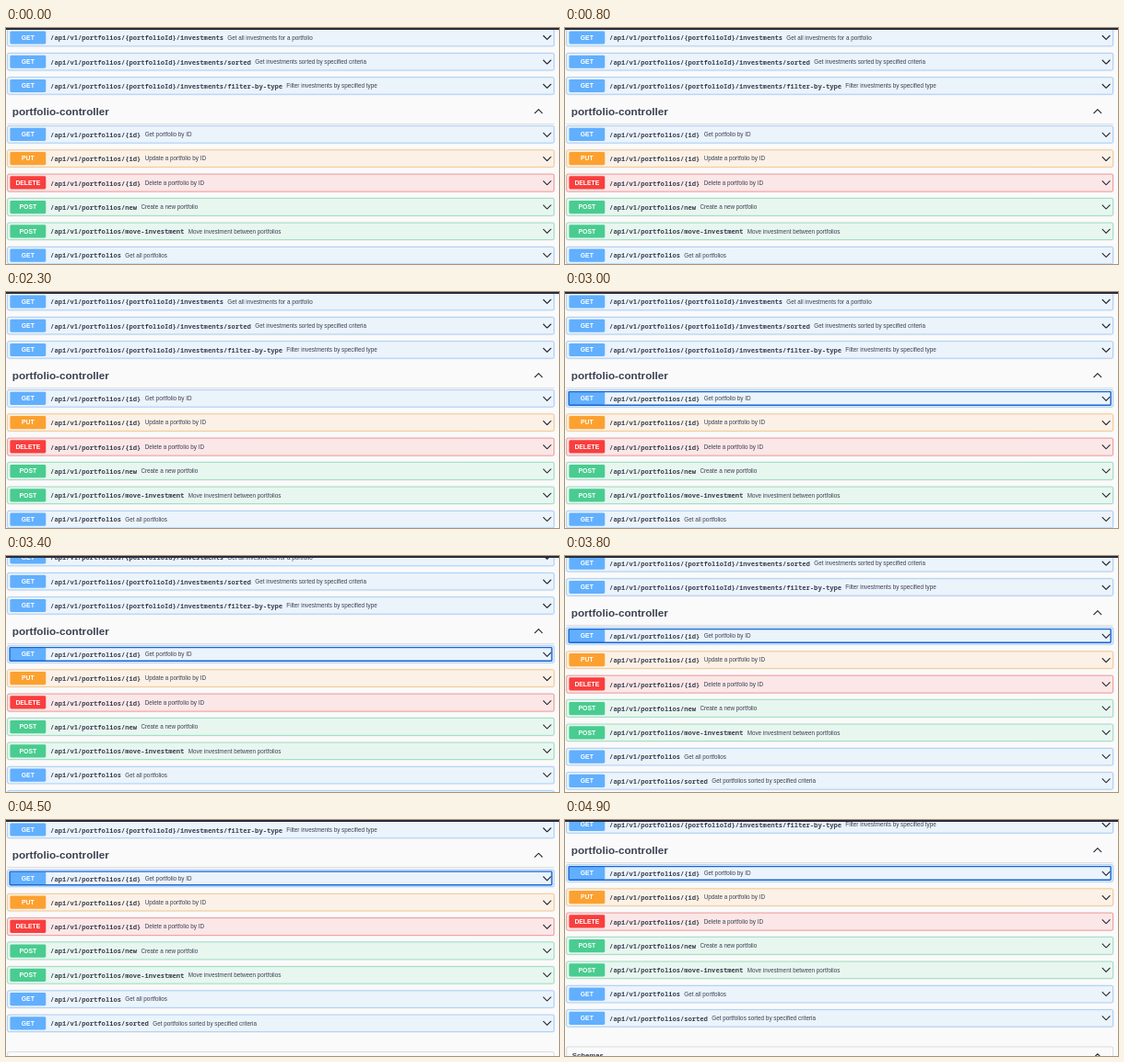
Recreate the animation shown at these times as an HTML page. Size 600 px wide and 257 px high, loop 5 s.

```html
<!DOCTYPE html>
<html lang="en">
<head>
<meta charset="utf-8">
<title>API list</title>
<style>
  html, body { margin: 0; width: 100%; height: 100%; overflow: hidden; background: #fafafa; }
  body { position: relative; font-family: "Liberation Sans", Arial, sans-serif; color: #3b4151; }
  #bar { position: absolute; top: 0; left: 0; width: 100%; height: 1.7px; background: #292a3b; }
  /* The page is laid out at full size and scaled down to the stage. */
  #page { position: absolute; top: 0; left: 0; width: 1235px; height: 700px; transform-origin: 0 0; }
  .row, .head, .box { position: absolute; left: 3px; width: 1221px; box-sizing: border-box;
    display: flex; align-items: center; white-space: pre; }
  .row { height: 39.2px; padding: 0 5px; border: 1px solid var(--c); border-radius: 4px;
    background: color-mix(in srgb, var(--c) 10%, transparent); box-shadow: 0 0 3px rgba(0,0,0,.19); }
  .row b { width: 80px; height: 29px; line-height: 29px; border-radius: 3px; text-align: center;
    background: var(--c); color: #fff; font-size: 14px; }
  code { margin: 0 9px 0 10px; font: 600 14.65px "Noto Sans Mono", monospace; }
  .row span { flex: 1; font-size: 13px; }
  .row.focus::after { content: ""; position: absolute; inset: 2px 3px; border: 3px solid #1b66d2; border-radius: 3px; }
  .head { height: 54px; padding: 0 25px 0 11px; border-bottom: 1px solid rgba(59,65,81,.3); font: bold 24px "Liberation Sans", Arial, sans-serif; }
  .box { height: 42px; padding: 0 24px 0 12px; border: 1px solid rgba(59,65,81,.35); border-radius: 4px; font: bold 16px "Liberation Sans", Arial, sans-serif; }
  .head span, .box span { flex: 1; }
  svg { width: 20px; height: 12px; fill: none; stroke: #20242e; stroke-width: 2.3; }
  .up { transform: scaleY(-1); }
  .copy { position: relative; height: 24px; border-radius: 4px; background: #7d8293; overflow: hidden; }
  .copy::after { content: ""; position: absolute; left: 4px; top: 6px; width: 11px; height: 10px; border: 1.5px solid #fff; }
</style>
</head>
<body>
<div id="page"></div>
<div id="bar"></div>
<script>
const SCALE = 0.486, PITCH = 26.3, LOOP = 5000;
const colors = { GET: "#61affe", PUT: "#fca130", DELETE: "#f93e3e", POST: "#49cc90" };
const base = "/api/v1/portfolios", inv = base + "/{portfolioId}/investments";
const lists = [
  [10.4, [
    ["GET", inv, "Get all investments for a portfolio"],
    ["GET", inv + "/sorted", "Get investments sorted by specified criteria"],
    ["GET", inv + "/filter-by-type", "Filter investments by specified type"]]],
  [116, [
    ["GET", base + "/{id}", "Get portfolio by ID"],
    ["PUT", base + "/{id}", "Update a portfolio by ID"],
    ["DELETE", base + "/{id}", "Delete a portfolio by ID"],
    ["POST", base + "/new", "Create a new portfolio"],
    ["POST", base + "/move-investment", "Move investment between portfolios"],
    ["GET", base, "Get all portfolios"],
    ["GET", base + "/sorted", "Get portfolios sorted by specified criteria"]]]
];
const page = document.getElementById("page");
const arrow = cls => `<svg class="${cls}" viewBox="0 0 20 12"><path d="M1 1.5L10 10.5L19 1.5"/></svg>`;

function add(cls, mid, height, html) {
  const el = document.createElement("div");
  el.className = cls;
  el.style.top = mid / SCALE - height / 2 + "px";
  el.innerHTML = html;
  page.append(el);
  return el;
}

const rows = lists.flatMap(([y, list]) => list.map(([method, path, text], i) => {
  const el = add("row", y + i * PITCH, 39.2,
    `<b>${method}</b><code>${path}</code><span>${text}</span>${arrow("")}<div class="copy"></div>`);
  el.style.setProperty("--c", colors[method]);
  return el;
}));
add("head", 91.2, 54, `<span>portfolio-controller</span>${arrow("up")}`);
add("box", 315, 42, `<span>Schemas</span>${arrow("up")}`);

// Piecewise linear value through [time, value] points
function along(points, t) {
  let [t0, v0] = points[0];
  for (const [t1, v1] of points) {
    if (t < t1) return t <= t0 ? v0 : v0 + (v1 - v0) * (t - t0) / (t1 - t0);
    [t0, v0] = [t1, v1];
  }
  return v0;
}

const scroll = [[3100, 0], [3200, 2], [3400, 9], [3800, 29], [4200, 44.5], [4500, 52.5], [4900, 58]];
const hovers = [
  [0, [[1200, 0], [1450, 16], [1750, 0]]],
  [2, [[1450, 0], [1650, 16], [1950, 0]]]
];

function draw(now) {
  const t = Math.floor(now % LOOP / 100) * 100;
  page.style.transform = `translateY(${-along(scroll, t)}px) scale(${SCALE})`;
  rows[3].classList.toggle("focus", t >= 2500);
  for (const [i, points] of hovers) {
    const w = along(points, t), copy = rows[i].lastChild;
    copy.style.width = w * 0.75 + "px";
    copy.style.marginLeft = w * 0.25 + "px";
  }
  requestAnimationFrame(draw);
}
draw(performance.now());
</script>
</body>
</html>
```
